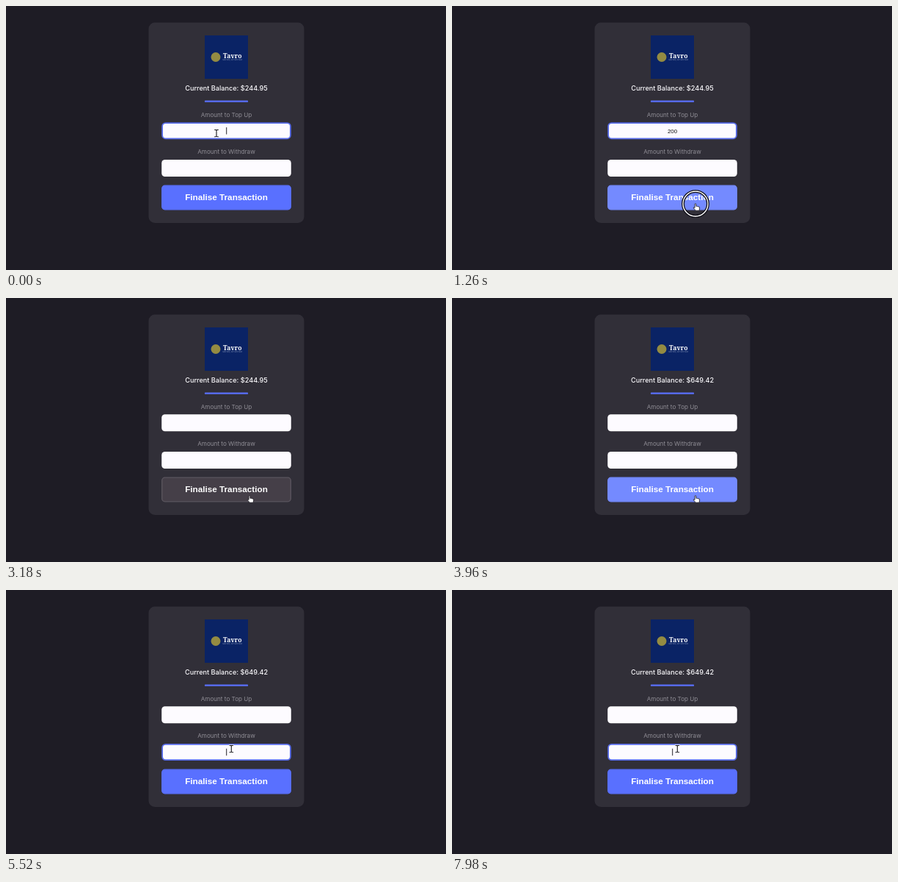
Recreate the animation shown at these times as an HTML page. Size 600 by 359 pixels, loop 8000 ms.

```html
<!DOCTYPE html>
<html lang="en">
<head>
<meta charset="utf-8">
<title>Account top up</title>
<style>
  html, body { margin: 0; width: 100%; height: 100%; overflow: hidden; background: #1e1c25; }
  svg { display: block; width: 100vw; height: 100vh; }
  text { text-anchor: middle; }
  .balance { font: 500 9.15px Inter, sans-serif; fill: #fbfafd; }
  .label { font: 400 8.15px Inter, sans-serif; fill: #8f8d95; }
  .typed { font: 7.84px "Liberation Sans", Arial, sans-serif; fill: #111; }
  .action { font: bold 11.72px "Liberation Sans", Arial, sans-serif; fill: #fff; }
  .brand { font: bold 8.6px "Noto Serif", serif; fill: #fff; }
  .tagline { font: 2.4px Inter, sans-serif; fill: #8190b4; }
  .caret { fill: #26242b; }
</style>
</head>
<body>
<svg viewBox="0 0 600 359">
  <rect width="600" height="359" fill="#1e1c25"/>
  <rect x="194.5" y="22.5" width="212" height="272.5" rx="8.5" fill="#312f38"/>

  <rect x="271" y="40" width="59" height="59" fill="#0a2365"/>
  <circle cx="286" cy="69.5" r="6.5" fill="#948b42"/>
  <text class="brand" x="308.7" y="71.3">Tavro</text>
  <text class="tagline" x="308.7" y="74.2">save well, live with ease</text>

  <text class="balance" id="balance" x="300.5" y="115.3"></text>
  <rect x="271" y="128.6" width="59" height="2.2" rx=".6" fill="#5a70fb"/>

  <text class="label" x="300.5" y="150.6">Amount to Top Up</text>
  <rect id="topUp" rx="4.5"/>
  <text class="typed" id="typed" x="300.5" y="172.6"></text>
  <rect class="caret" id="topCaret" y="165" width="1" height="9.5"/>

  <text class="label" x="300.5" y="201.4">Amount to Withdraw</text>
  <rect id="withdraw" rx="4.5"/>
  <rect class="caret" id="withdrawCaret" x="300.2" y="215.7" width="1" height="9.5"/>

  <rect id="button" x="212.7" y="244.2" width="175.6" height="32.6" rx="4" stroke-width="1.3"/>
  <text class="action" x="300.5" y="264.3">Finalise Transaction</text>

  <g id="pointer">
    <g id="ring" fill="none">
      <circle r="17" stroke="#111018" stroke-width="4"/>
      <circle r="17" stroke="#fff" stroke-width="1.4"/>
    </g>
    <g id="beam" fill="none" stroke-linecap="round">
      <path id="beamShape" d="M-2.4-4.8Q-.3-4.8 0-3.8Q.3-4.8 2.4-4.8M0-3.8V3.8M-2.4 4.8Q-.3 4.8 0 3.8Q.3 4.8 2.4 4.8" stroke="#fff" stroke-width="2.2"/>
      <use href="#beamShape" style="display:none"/>
      <path d="M-2.4-4.8Q-.3-4.8 0-3.8Q.3-4.8 2.4-4.8M0-3.8V3.8M-2.4 4.8Q-.3 4.8 0 3.8Q.3 4.8 2.4 4.8" stroke="#16141b" stroke-width="1.1"/>
    </g>
    <path id="hand" fill="#fff" stroke="#16141b" stroke-width=".8" stroke-linejoin="round"
      d="M-.9.7Q-.9-.3 0-.3T.9.7V3.4Q1.8 2.8 2.5 3.6Q3.4 3.1 4 4Q5.6 3.7 5.6 5.2V7Q5.4 8.2 4.7 9.2H.2Q-.7 7.8-2.5 6.1Q-3.2 4.8-2 4.7L-.9 5.5Z"/>
    <path id="arrow" fill="#16141b" stroke="#fff" stroke-width=".8" stroke-linejoin="round"
      d="M0 0V9.2L2.1 7.3L3.6 10.6L5 10L3.6 6.8H6.4Z"/>
  </g>
</svg>
<script>
const LOOP = 8000;
const KEYS = [360, 540, 660];
const AMOUNT = "200";
const BLINK = 565;
const SUBMIT = 1370, CLEARED = 2880, DONE = 3840, REFOCUS = 5330;
const PATH = [[880, 287, 173], [1180, 332, 269], [4520, 332, 269], [5060, 307.3, 216]];

const el = id => document.getElementById(id);
const setAttrs = (id, attrs) => {
  for (const name in attrs) el(id).setAttribute(name, attrs[name]);
};
const show = (id, on) => { el(id).style.display = on ? "" : "none"; };
const within = (t, start, end) => t >= start && t < end;
const ease = p => p * p * (3 - 2 * p);
const blinkOn = elapsed => Math.floor(elapsed / BLINK) % 2 === 0;

function pointerAt(t) {
  if (t <= PATH[0][0]) return PATH[0].slice(1);
  for (let i = 1; i < PATH.length; i++) {
    const [t0, x0, y0] = PATH[i - 1], [t1, x1, y1] = PATH[i];
    if (t < t1) {
      const p = ease((t - t0) / (t1 - t0));
      return [x0 + (x1 - x0) * p, y0 + (y1 - y0) * p];
    }
  }
  return PATH[PATH.length - 1].slice(1);
}

function drawField(id, y, focused) {
  const inset = focused ? .9 : 0;
  setAttrs(id, {
    x: 212.2 + inset, y: y + inset,
    width: 176.6 - 2 * inset, height: 23 - 2 * inset,
    fill: "#fdfbff", stroke: focused ? "#586ce9" : "none", "stroke-width": 1.8
  });
}

function drawButton(loading, hovered) {
  const fill = loading ? "#453f48" : hovered ? "#748aff" : "#5970ff";
  setAttrs("button", { fill, stroke: loading ? "#5b565f" : fill });
}

function render(t) {
  const count = KEYS.filter(k => t >= k).length;
  const lastKey = count ? KEYS[count - 1] : 0;
  const topFocused = t < SUBMIT, withdrawFocused = t >= REFOCUS;
  const loading = within(t, SUBMIT, DONE);
  const [x, y] = pointerAt(t);
  const overButton = within(y, 244, 277);
  const overField = within(y, 158, 181) || within(y, 209, 232);

  el("balance").textContent = "Current Balance: $" + (t < DONE ? "244.95" : "649.42");
  el("typed").textContent = t < CLEARED ? AMOUNT.slice(0, count) : "";

  drawField("topUp", 158.2, topFocused);
  drawField("withdraw", 209, withdrawFocused);
  drawButton(loading, overButton);

  setAttrs("topCaret", { x: 300.2 + count * 2.18 });
  show("topCaret", topFocused && blinkOn(t - lastKey));
  show("withdrawCaret", withdrawFocused && blinkOn(t - REFOCUS));

  setAttrs("pointer", { transform: `translate(${x} ${y})` });
  show("beam", overField);
  show("hand", overButton);
  show("arrow", !overField && !overButton);
  show("ring", within(t, 1210, 1390) || within(t, 5230, 5410));
}

const start = performance.now();
function tick() {
  render((performance.now() - start) % LOOP);
  requestAnimationFrame(tick);
}
tick();
</script>
</body>
</html>
```
